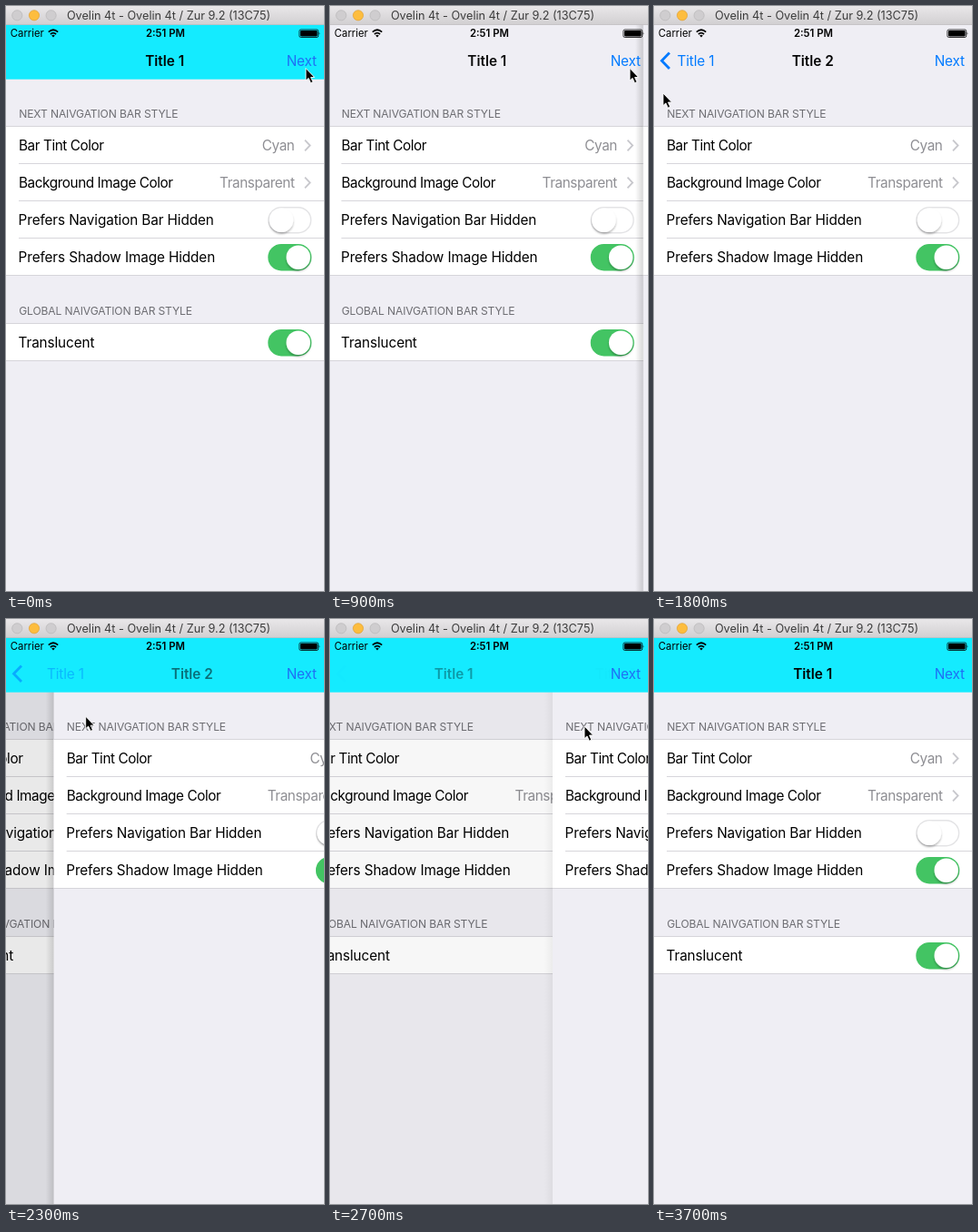
An HTML page for the animation above (3800 ms loop, 350 px wide and 644 px high).

```html
<!DOCTYPE html>
<html lang="en">
<head>
<meta charset="utf-8">
<title>Navigation bar transition</title>
<style>
html, body { margin: 0; height: 100%; overflow: hidden; }
svg { display: block; width: 350px; height: 644px; font-family: Inter, "Liberation Sans", sans-serif; }
.row, .title, .blue { font-size: 15.3px; letter-spacing: -.11px; }
.tight { letter-spacing: -.42px; }
.title { font-weight: 600; letter-spacing: 0; text-anchor: middle; }
.blue { fill: #007aff; }
.head { font-size: 12.1px; letter-spacing: -.13px; fill: #6d6d72; }
.value { fill: #8e8e93; text-anchor: end; }
.status { font-size: 11.3px; }
</style>
</head>
<body>
<svg viewBox="0 0 350 644">
  <defs>
    <linearGradient id="chrome" x2="0" y2="1">
      <stop stop-color="#e9e7e9"/><stop offset="1" stop-color="#d1cfd1"/>
    </linearGradient>
    <linearGradient id="edge">
      <stop stop-opacity="0"/><stop offset="1" stop-opacity=".16"/>
    </linearGradient>
    <filter id="soft" x="-30%" y="-30%" width="160%" height="170%">
      <feDropShadow dx="0" dy="2" stdDeviation="1.3" flood-opacity=".28"/>
    </filter>
  </defs>
  <g id="first"></g>
  <rect id="dim" width="350" height="644"/>
  <g id="second"></g>
  <rect id="cyan" y="20" width="350" height="60.7" fill="#14ebff"/>

  <text id="title1" class="title" y="65.5">Title 1</text>
  <text id="title2" class="title" y="65.5">Title 2</text>
  <text id="back" class="blue" y="65.5" text-anchor="middle">Title 1</text>
  <path id="arrow" d="M17 51.5L8.5 60.3 17 69" fill="none" stroke="#007aff" stroke-width="2.8"/>
  <text id="next" class="blue" x="342" y="65.5" text-anchor="end">Next</text>

  <text class="status" x="4.8" y="34.3">Carrier</text>
  <path d="M46.8 28.6Q52 23.9 57.2 28.6M48.9 31Q52 28.2 55.1 31" fill="none" stroke="#000" stroke-width="1.7"/>
  <path d="M50.2 32.4Q52 31 53.8 32.4L52 34.4Z"/>
  <text class="status" x="175.4" y="34.3" font-weight="600" text-anchor="middle">2:51 PM</text>
  <rect x="322.9" y="26" width="20.8" height="8.5" rx="1.6" fill="none" stroke="#000" stroke-width=".8"/>
  <rect x="324" y="27.1" width="18.6" height="6.3" rx=".8"/>
  <path d="M344.6 28.8q1.6 1.4 0 2.9z"/>

  <rect width="350" height="20.8" fill="url(#chrome)"/>
  <path d="M0 20.5H350" stroke="#bdb9bd" stroke-width=".6"/>
  <g fill="#cfcdcf" stroke="#b8b6b8" stroke-width=".7">
    <circle cx="12.3" cy="10.3" r="5.6"/>
    <circle cx="31" cy="10.3" r="5.6" fill="#fdbd3e" stroke="#e0a033"/>
    <circle cx="49.6" cy="10.3" r="5.6"/>
  </g>
  <text x="179" y="14.8" font-size="12.7" fill="#3c3c3c" text-anchor="middle">Ovelin 4t - Ovelin 4t / Zur 9.2 (13C75)</text>

  <path id="cursor" d="M0 0V13.6L3 10.9 5.4 16.2 7.8 15.1 5.5 10H9.6Z" stroke="#fff" stroke-width=".9"/>
</svg>
<script>
const $ = id => document.getElementById(id);
const LOOP = 3800, STEP = 100, W = 350, ROW = 41;

const header = (y, s) => `<text class="head" x="14.2" y="${y}">${s}</text>`;
const line = (x, y) => `<path d="M${x} ${y}H${W}" stroke="#d3d2d7" stroke-width=".9"/>`;
const text = (x, y, s, kind = '') => `<text class="row ${kind}" x="${x}" y="${y + 5.4}">${s}</text>`;

const choice = (y, s, value) => text(14, y, s, 'tight') + text(317.5, y, value, 'tight value') +
  `<path d="M329 ${y - 5.8}l5.6 5.8-5.6 5.8" fill="none" stroke="#c7c7cc" stroke-width="1.8"/>`;

const toggle = (y, s, on) => text(13.6, y, s) +
  `<rect x="289" y="${y - 13.8}" width="46.6" height="28" rx="14"
     fill="${on ? '#43c463' : '#fff'}" stroke="${on ? '#43c463' : '#e3e3e5'}" stroke-width="1.4"/>
   <circle cx="${on ? 321.7 : 303}" cy="${y + .2}" r="13.2" fill="#fff" filter="url(#soft)"/>`;

function group(top, rows) {
  let out = `<rect y="${top}" width="${W}" height="${rows.length * ROW}" fill="#fff"/>`;
  rows.forEach(([make, ...args], i) => {
    out += line(i ? 14 : 0, top + i * ROW) + make(top + i * ROW + 21, ...args);
  });
  return out + line(0, top + rows.length * ROW);
}

const page = `<rect width="${W}" height="644" fill="#efeef4"/>` +
  header(123.4, 'NEXT NAIVGATION BAR STYLE') +
  group(132.5, [
    [choice, 'Bar Tint Color', 'Cyan'],
    [choice, 'Background Image Color', 'Transparent'],
    [toggle, 'Prefers Navigation Bar Hidden', false],
    [toggle, 'Prefers Shadow Image Hidden', true]
  ]);
$('first').innerHTML = page + header(340.4, 'GLOBAL NAIVGATION BAR STYLE') +
  group(349.5, [[toggle, 'Translucent', true]]);
$('second').innerHTML = '<rect id="shade" x="-9" width="9" height="644" fill="url(#edge)"/>' + page;

// Pointer path: time, x, y
const PATH = [
  [0, 330, 68.5], [900, 330, 68.5], [1200, 150.5, 80], [1500, 30, 93], [1800, 10, 96],
  [2000, 12, 97], [2200, 42, 104], [2500, 179, 113.5], [2700, 280, 118], [2900, 359, 120], [3800, 400, 120]
];

function pointer(t) {
  const i = PATH.findIndex(p => p[0] > t);
  const a = PATH[i - 1], b = PATH[i], k = (t - a[0]) / (b[0] - a[0]);
  return [a[1] + (b[1] - a[1]) * k, a[2] + (b[2] - a[2]) * k];
}

// Left edge of the second page: pushed in by a decaying slide, dragged out by the pointer
function edgeAt(t, px) {
  if (t < 900 || t >= 3000) return W;
  if (t < 1900) return W * Math.exp(-12.3 * (t - 898.8) / 1000);
  return Math.min(W, Math.max(0, px - 35));
}

function place(id, x, alpha) {
  $(id).setAttribute('x', x);
  $(id).setAttribute('opacity', alpha);
}

function draw(t) {
  const [px, py] = pointer(t);
  const edge = edgeAt(t, px), p = edge / W, push = t < 1900;
  const tinted = t < 900 || (!push && edge > 0);
  const backAlpha = p === 1 ? 0 : push ? Math.min(1, (t - 900) / 550) : (1 - p) ** 5;
  const title = 174.7 - 128.7 * (1 - p);

  $('first').setAttribute('transform', `translate(${-.3 * (W - edge)})`);
  $('second').setAttribute('transform', `translate(${edge + (p === 1 ? 20 : 0)})`);
  $('dim').setAttribute('opacity', .1 * (1 - p));
  $('shade').setAttribute('opacity', push ? p : 1 - p);
  $('cyan').setAttribute('opacity', +tinted);
  $('next').style.fill = tinted ? '#1f6ff5' : '#007aff';
  place('title1', title, p ** 3);
  place('back', title, backAlpha);
  place('title2', 174.7 + (push ? 100 : 200) * p, (1 - p) ** 4);
  $('arrow').setAttribute('opacity', backAlpha ** .7);
  $('cursor').setAttribute('transform', `translate(${px} ${py})`);
}

const start = performance.now();
function tick() {
  const t = (performance.now() - start) % LOOP;
  draw(Math.floor(t / STEP) * STEP);
  requestAnimationFrame(tick);
}
tick();
</script>
</body>
</html>
```
